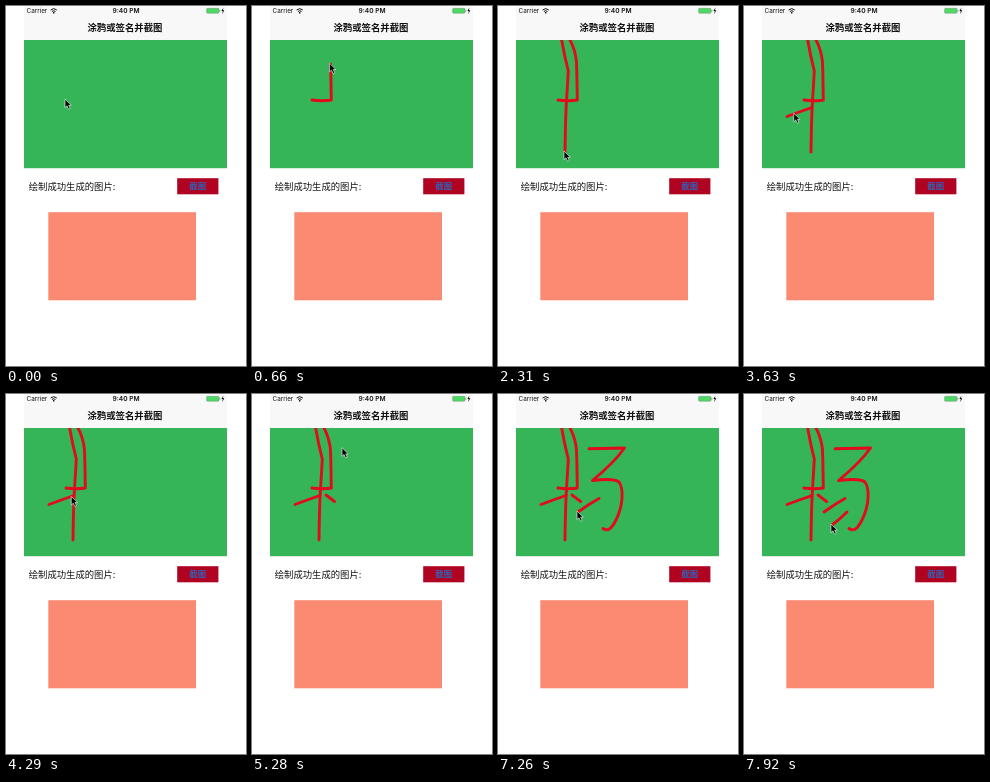
An HTML page for the animation above (8 s loop, 240 by 360 pixels).

```html
<!DOCTYPE html>
<html lang="zh-CN">
<head>
<meta charset="utf-8">
<title>涂鸦</title>
<style>
  html, body { margin: 0; width: 100%; height: 100%; overflow: hidden; background: #fff; }
  svg { display: block; width: 100vw; height: 100vh; }
  text { font-family: "Noto Sans CJK SC", "Noto Sans CJK", "Noto Sans", sans-serif; fill: #111; }
  .status { font-family: Inter, Roboto, sans-serif; }
  .action { fill: #2f62b8; }
  #ink path { fill: none; stroke: #e20a1b; stroke-width: 2.9; stroke-linecap: round; stroke-linejoin: round; }
</style>
</head>
<body>
<svg viewBox="0 0 240 360">
  <defs><clipPath id="board"><rect x="18" y="34" width="203" height="128"/></clipPath></defs>

  <rect x="18" width="203" height="34" fill="#f8f8f8"/>
  <text class="status" x="20.5" y="7.3" font-size="6.35">Carrier</text>
  <g fill="none" stroke="#111" stroke-width="1">
    <path d="M44.6 4Q47.7 1.2 50.8 4M45.9 5.5Q47.7 3.9 49.5 5.5"/>
    <path d="M47.7 6.1V7.4" stroke-width="1.4"/>
  </g>
  <text class="status" x="120" y="7.3" font-size="6.6" font-weight="600" text-anchor="middle">9:40 PM</text>
  <rect x="200.6" y="2.3" width="12.4" height="5" rx="1" fill="#4cd964" stroke="#777" stroke-width=".4"/>
  <path d="M213.8 3.8V5.8" stroke="#777" stroke-width=".7"/>
  <path d="M217.4 1.7L215.4 5.1H216.8L216.2 7.9L218.3 4.3H216.9Z"/>
  <text x="119" y="25.4" font-size="9.4" font-weight="700" text-anchor="middle">涂鸦或签名并截图</text>

  <rect x="18" y="34" width="203" height="128.2" fill="#35b558"/>
  <g id="ink" clip-path="url(#board)"></g>

  <text x="22.7" y="184" font-size="9.35">绘制成功生成的图片:</text>
  <rect x="171.2" y="172.2" width="41.2" height="16.1" fill="#b00322"/>
  <text class="action" x="191.7" y="183.4" font-size="8.4" font-weight="700" text-anchor="middle">截图</text>
  <rect x="42.3" y="206.2" width="147.7" height="88.1" fill="#fb8a72"/>

  <path id="cursor" d="M0 0V8.6L2 6.8L3.6 10.2L5.2 9.4L3.7 6.2H6.3Z" stroke="#fff" stroke-width=".6"/>
</svg>
<script>
const LOOP = 8000, STEP = 330;
const ink = document.getElementById('ink');
const cursor = document.getElementById('cursor');

// from and to are counted in steps
function stroke(from, to, d) {
  const path = document.createElementNS('http://www.w3.org/2000/svg', 'path');
  path.setAttribute('d', d);
  ink.append(path);
  return { from, to, path, length: path.getTotalLength() };
}

const strokes = [
  stroke(0, 2.6, 'M60 94Q70 95.5 79.3 94C79 80 79 66 78.4 55Q77 43 71.5 33'),
  stroke(3.5, 7, 'M63.5 33Q66 48 70.3 65Q69.5 80 68.5 95T67 146'),
  stroke(8, 10, 'M68 101.5Q55 106 43 110.5'),
  stroke(14, 15, 'M74 101L82.5 107.5'),
  stroke(16, 19, 'M91 54.7L126.5 54C118 66 106 77 94.5 86.5C107 85 117 85 121 88C126 95 125 112 118 126C114 134 110 138 105 134.5'),
  stroke(20, 22, 'M101 104.5Q91 110 80 118'),
  stroke(23, 24, 'M103 118Q95 126 88 131')
];

const clamp = u => Math.min(1, Math.max(0, u));
const ease = u => u ** 1.5;
const pointOn = (s, part) => s.path.getPointAtLength(part * s.length);

// on a stroke the pointer follows the ink, otherwise it glides to the next one
function pointerAt(step) {
  const i = strokes.findLastIndex(s => s.from <= step);
  const s = strokes[i], next = strokes[i + 1];
  const a = pointOn(s, ease(clamp((step - s.from) / (s.to - s.from))));
  if (step <= s.to || !next) return a;
  const b = pointOn(next, 0);
  const u = (step - s.to) / (next.from - s.to);
  return { x: a.x + (b.x - a.x) * u, y: a.y + (b.y - a.y) * u };
}

function render(time) {
  const step = Math.floor(time % LOOP / STEP);
  for (const { from, to, path, length } of strokes) {
    const part = ease(clamp((step - from) / (to - from)));
    path.style.visibility = part > 0 ? 'visible' : 'hidden';
    path.style.strokeDasharray = part < 1 ? `${part * length} ${length * 2}` : 'none';
  }
  const { x, y } = pointerAt(step);
  cursor.setAttribute('transform', `translate(${x - 1} ${y - 1})`);
}

const start = performance.now();
function tick() {
  render(performance.now() - start);
  requestAnimationFrame(tick);
}
tick();
</script>
</body>
</html>
```
